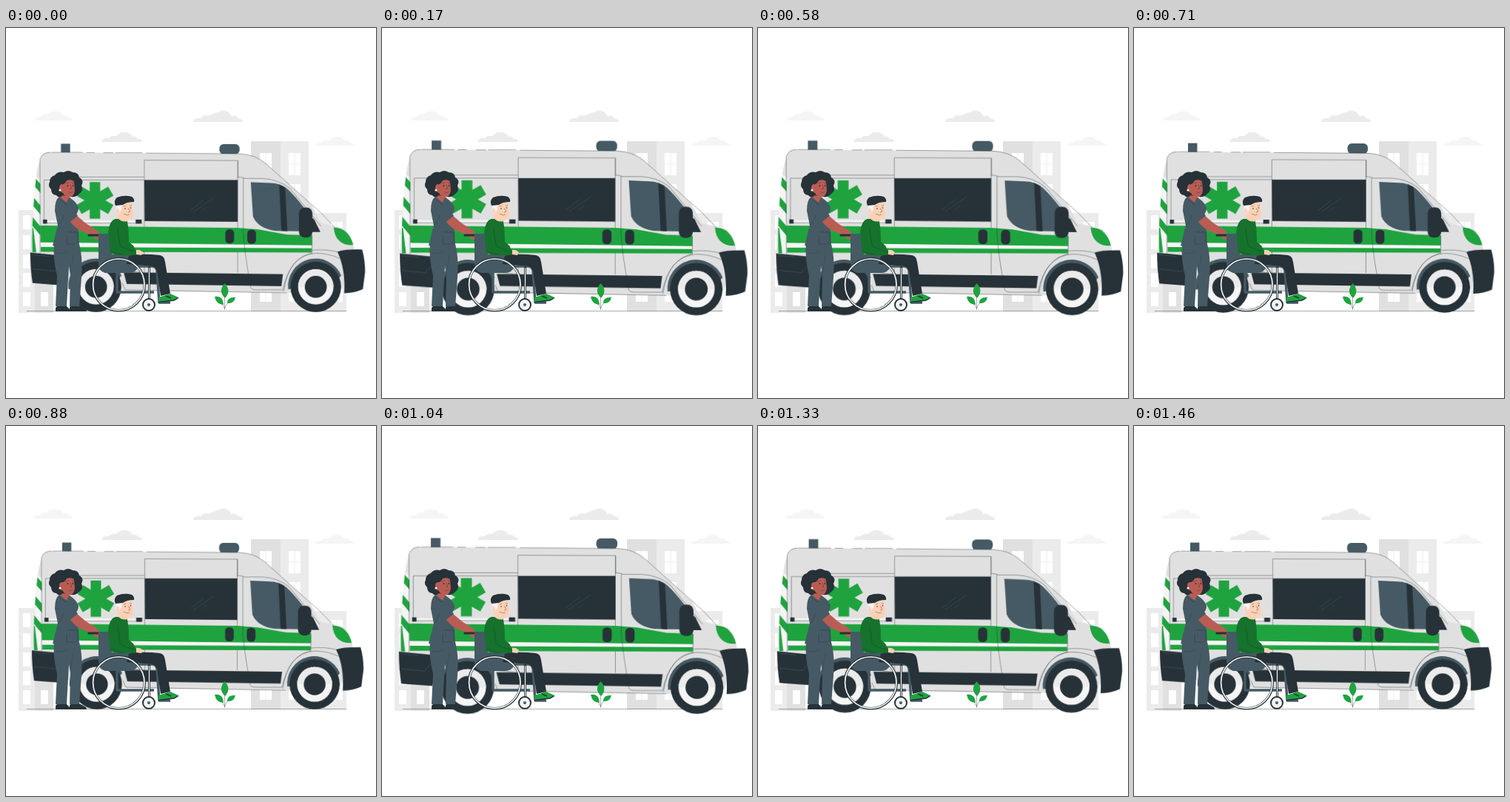
These frames come from a looping animation (500 px wide and 500 px high, 1500 ms). An HTML page:

```html
<!DOCTYPE html>
<html lang="en">
<head>
<meta charset="utf-8">
<title>Ambulance</title>
<style>
  html, body { margin: 0; width: 100%; height: 100%; overflow: hidden; background: #fff; }
  svg { display: block; width: 100vw; height: 100vh; }
  .green { fill: #1fa33f; }
  .dark { fill: #263238; }
  .slate { fill: #455a64; }
  .body { fill: #e0e0e0; }
  .pale { fill: #ebebeb; }
  .faint { fill: #f5f5f5; }
  .skin { fill: #b95d54; }
  .peach { fill: #ffd0b5; }
  .line { fill: none; stroke: #263238; stroke-width: .4; }
  .tube { fill: none; stroke: #455a64; stroke-width: 3.4; stroke-linejoin: round; }

  /* 36 drawings per loop: each leg holds its poses in even steps */
  .van { transform-origin: 259px 270px; animation: pulse 1500ms -4ms infinite; }
  @keyframes pulse {
    0% { transform: scale(1.01); animation-timing-function: steps(9); }
    25% { transform: scale(1.097); animation-timing-function: steps(11); }
    55.5556% { transform: scale(.987); animation-timing-function: steps(8); }
    77.7778% { transform: scale(1.095); animation-timing-function: steps(7); }
    97.2222% { transform: scale(1); animation-timing-function: steps(1); }
    100% { transform: scale(1.01); }
  }
</style>
</head>
<body>
<svg viewBox="0 0 500 500">
  <defs>
    <g id="pane">
      <path fill="#fff" d="M0 0h16v30H0z"/>
      <path fill="none" stroke="#e0e0e0" stroke-width=".6" d="M8 0v30M0 15h16"/>
    </g>
    <path id="slot" fill="#fff" d="M0 0h10v19H0z"/>
    <g id="wheel">
      <circle class="dark" r="33.8"/>
      <circle class="faint" r="23.7"/>
      <path class="pale" d="M-23.700 0A23.700 23.700 0 0 1 23.700 0z"/>
      <circle class="dark" r="14.7"/>
    </g>
    <path id="arch" class="slate" d="M-37 3A37 37 0 0 1 34 -15L20 0z"/>
    <rect id="arm" class="green" x="-7" y="-24.500" width="14" height="49"/>
    <clipPath id="rear"><path d="M43 201L48.500 206V303H38Q36 262 43 201z"/></clipPath>
  </defs>

  <!-- sky and town -->
  <path class="faint" d="M38 125Q39 120 46 121Q49 116 56 117Q62 111 70 113Q75 113 77 118Q83 117 84 121Q90 121 90 125z"/>
  <path class="pale" d="M129 154Q131 148 139 149Q142 145 149 146Q154 140 163 141Q168 142 171 147Q177 146 178 150Q184 150 184 154z"/>
  <path class="pale" d="M253 127Q254 121 263 122Q267 117 276 118Q282 114 287 114Q291 110 296 112Q301 112 304 119Q312 117 313 122Q320 122 320 127z"/>
  <path class="faint" d="M418 159Q419 155 427 155Q430 151 437 152Q442 146 450 147Q455 148 457 152Q463 151 464 155Q470 155 470 159z"/>
  <path class="pale" d="M409 250h51v133h-51zM371 153h38v230h-38z"/>
  <path class="body" d="M331 153h40v230h-40z"/>
  <use href="#pane" x="343" y="169"/><use href="#pane" x="343" y="211"/><use href="#pane" x="343" y="340"/>
  <use href="#pane" x="382" y="169"/><use href="#pane" x="382" y="211"/><use href="#pane" x="382" y="340"/>
  <use href="#pane" x="439" y="262"/><use href="#pane" x="439" y="340"/>
  <path class="pale" d="M17 246h22v139H17z"/>
  <path class="body" d="M39 246h25v139H39z"/>
  <use href="#slot" x="23" y="253"/><use href="#slot" x="23" y="280"/><use href="#slot" x="23" y="306"/>
  <use href="#slot" x="23" y="331"/><use href="#slot" x="23" y="357"/><use href="#slot" x="47" y="357"/>
  <path class="line" d="M28 382.500H460"/>

  <g class="van">
    <rect class="slate" x="76" y="157.500" width="12.300" height="13"/>
    <rect class="slate" x="288" y="158" width="27" height="13.500" rx="5.500"/>
    <path class="body" d="M43 201Q46 182 50 174Q53 169 62 169L316 171Q336 172 350 184L411 239L424 264Q443 268 456 272Q467 282 469 303L452 352L382 357L160 354L60 340L36 303Q36 262 43 201z"/>
    <path class="line" d="M48 178Q51 169 62 169M63 169H105M110 169.300H121M133 169.500H146M149 169.500H185M190 170L316 171Q336 172 350 184L425 251L443 270"/>
    <g clip-path="url(#rear)">
      <path fill="#f5f5f5" d="M34 200H50V304H34z"/>
      <path class="green" d="M35 196L50 213V225L35 208zM35 224L50 242V254L35 236zM35 252L50 270V282L35 264zM35 270H39L43 303H37z"/>
    </g>
    <path class="line" d="M48 178V304M75 202H187M53.500 262V206H187M187.500 330V179.500L312.500 180V330M313 202L321 203"/>
    <path class="faint" d="M56 260.300H180V263.300H56z"/>
    <path class="line" d="M54 263.500H184"/>
    <path class="dark" d="M52 259h5.500v5.500H52zM176 259h8v5.500h-8z"/>
    <g transform="translate(121.500 233.300)">
      <use href="#arm"/><use href="#arm" transform="rotate(60)"/><use href="#arm" transform="rotate(120)"/>
    </g>

    <!-- stripes -->
    <path class="faint" d="M49 289L411 293V299L49 296z"/>
    <path class="green" d="M48.500 267L313 270L340 272L378 279L412 280V293.500L48.500 289.500z"/>
    <path class="green" d="M49 295.500L411.500 297.300V303L49 302z"/>
    <path class="dark" d="M160 329.500L373 332L371 348L164 345z"/>
    <path class="line" d="M158 344L162 353L323 356L378 357M150 326L187 330"/>

    <path class="dark" d="M187.500 206H312.500V262L188 261z"/>
    <path fill="none" stroke="#455a64" stroke-width=".5" d="M249 247L267 233M253 249L281 230M265 247L272 242"/>

    <!-- cab -->
    <path class="line" d="M330 350Q321 300 320 275V204H346Q367 205 382 217L424 268M330 350Q331 353 338 353H373Q382 310 412 304M313 180V203M412 280V304"/>
    <path class="slate" d="M330 209L356 210Q369 210 379 218Q400 238 423 275L363 274Q340 271 333 255z"/>
    <path class="dark" d="M368 212L376 216L379 274.500L371 274z"/>
    <path class="dark" d="M409 254L415 259L423 275.500H405z"/>
    <rect class="dark" x="394.500" y="243" width="18" height="40" rx="7.500"/>
    <rect class="dark" x="296" y="272" width="11.700" height="19" rx="5"/>
    <rect class="dark" x="325.300" y="272.500" width="11.700" height="19" rx="5"/>
    <path class="green" d="M441 269.500Q453 270 458 276Q465 283 467 293Q456 294 449 288Q442 282 441 269.500z"/>
    <path class="line" d="M374 355Q381 306 417 304Q434 304 449 311M412 300Q432 298 449 303"/>
    <use href="#arch" x="417" y="349"/>
    <path class="dark" d="M446 302Q455 298.500 479 299Q483 313 483 329L480 352Q470 357 455 357.500Q457 326 446 302z"/>
    <use href="#arch" x="123" y="349"/>
    <path class="dark" d="M35 303L75 307L97 306Q83 318 78 347L38 344Q35 325 35 303z"/>
    <path fill="none" stroke="#455a64" stroke-width=".6" d="M38 325L68 328L84 309M38 306L60 308"/>
    <use href="#wheel" x="123" y="349"/>
    <use href="#wheel" x="417" y="349"/>
  </g>

  <!-- nurse -->
  <path class="dark" d="M67 383V378L71 374L81 375L87 381V383zM86 383V377L91 374L99 375L108 380Q110 383 108 383z"/>
  <path class="slate" d="M65 292L99 292Q104 310 102 337L99 376H86L87 333L85 322L82 376H67L69 335Q63 310 65 292z"/>
  <path class="line" d="M87 333L91 307M67 304Q78 306 82 302" stroke-opacity=".6"/>
  <path class="skin" d="M75 218L84 220V227L88 230L80 239L72 229z"/>
  <path class="slate" d="M72 228Q66 232 66 247L70 267L63 294Q78 299 99 295L98 275L93 254Q98 249 98 243Q95 234 85 229L82 236z"/>
  <path class="line" d="M80 236L95 250M72 231L82 239M84 276H97V292M82 280V292H94M70 267Q75 263 78 253"/>
  <path class="skin" d="M85 259L95 253L108 264L122 273Q127 275 126 285L121 286L118 281L103 275Q93 271 85 259z"/>
  <path class="slate" d="M78 239Q87 236 91 244L97 254L85 263L79 253z"/>
  <path class="dark" d="M61 218Q56 214 59 208Q59 201 66 199Q70 193 78 195Q84 191 90 195Q98 195 99 202Q106 206 102 213Q105 220 99 224Q95 229 88 228L77 226Q72 231 68 226Q61 225 61 218z"/>
  <path class="skin" d="M76 211Q79 212 82 206Q90 204 92 208L93 219Q92 228 86 228Q80 229 77 223Q72 221 72 216Q72 211 76 211z"/>
  <path class="line" stroke-width=".8" d="M81 210L85 209M89 209L92 210M87 212L89 217L86 218M84 222Q87 224 90 221"/>
  <circle class="dark" cx="83.500" cy="213" r=".9"/><circle class="dark" cx="90.500" cy="213" r=".9"/>
  <circle fill="#fff" cx="73" cy="219" r="1.500"/>

  <!-- wheelchair and passenger -->
  <path fill="none" stroke="#263238" stroke-width="3.200" stroke-linecap="round" d="M112 280H124"/>
  <path class="slate" d="M125 278H138L143 306H179V322Q176 331 166 331H134Q125 329 125 318z"/>
  <path class="tube" d="M150 318V357H200M176 322H198Q203 322 204 328L207 371H222"/>
  <path class="dark" d="M166 308Q180 304 208 307Q214 308 215 316L222 359L209 362L204 328Q201 320 188 321L163 319z"/>
  <path class="green" d="M206 364L222 359L233 364Q232 368 222 369L206 371z"/>
  <path class="line" style="stroke-width:1.4" d="M206 370.500L227 368L233 364.500M216 362L223 365"/>
  <path fill="#16722c" d="M148 258Q139 260 138 279L141 305Q158 309 178 306L172 294L166 289Q166 267 163 258z"/>
  <path fill="none" stroke="#0d5a24" stroke-width=".7" d="M151 271L154 294Q162 300 175 302M142 300Q147 305 158 306"/>
  <path class="peach" d="M176 300Q181 299 185 303L183 307L176 306z"/>
  <path class="peach" d="M152 238L170 236L172 249Q173 258 166 259L164 261Q157 263 151 257z"/>
  <path fill="#f5f5f5" d="M150 238L157 237L156 245L153 251L148 246z"/>
  <path class="peach" d="M152 244Q148 243 149 247Q150 251 154 250z"/>
  <path class="dark" d="M148 240Q145 233 150 229Q160 225 170 228Q174 231 173 235Q163 235 158 239z"/>
  <path class="line" d="M159 241L162 240M167 240L170 240M165 243L168 248L165 249M159 251Q163 254 167 252"/>
  <circle class="dark" cx="161" cy="244" r=".8"/><circle class="dark" cx="168.500" cy="243" r=".8"/>

  <g fill="none">
    <circle cx="152.300" cy="346.700" r="35" stroke="#263238" stroke-width="3.400"/>
    <circle cx="152.300" cy="346.700" r="34.700" stroke="#f5f5f5" stroke-width="1.700"/>
    <path stroke="#263238" stroke-width="3" d="M193.500 322V367"/>
    <path stroke="#f5f5f5" stroke-width="1.200" d="M193.500 324V366"/>
  </g>
  <circle cx="193" cy="374" r="8" fill="#f5f5f5" stroke="#263238" stroke-width="2"/>
  <circle class="slate" cx="193" cy="374" r="2"/>

  <!-- sprout -->
  <path class="line" d="M295.500 381V350M295.500 379Q293 372 285 365M295.500 379Q298 371 307 366"/>
  <path class="green" d="M295.500 345Q305 355 296 365Q286 356 295.500 345zM282 363Q293 361 294 374Q284 374 282 363zM299 372Q299 363 310 364Q308 373 299 372z"/>
</svg>
</body>
</html>
```
